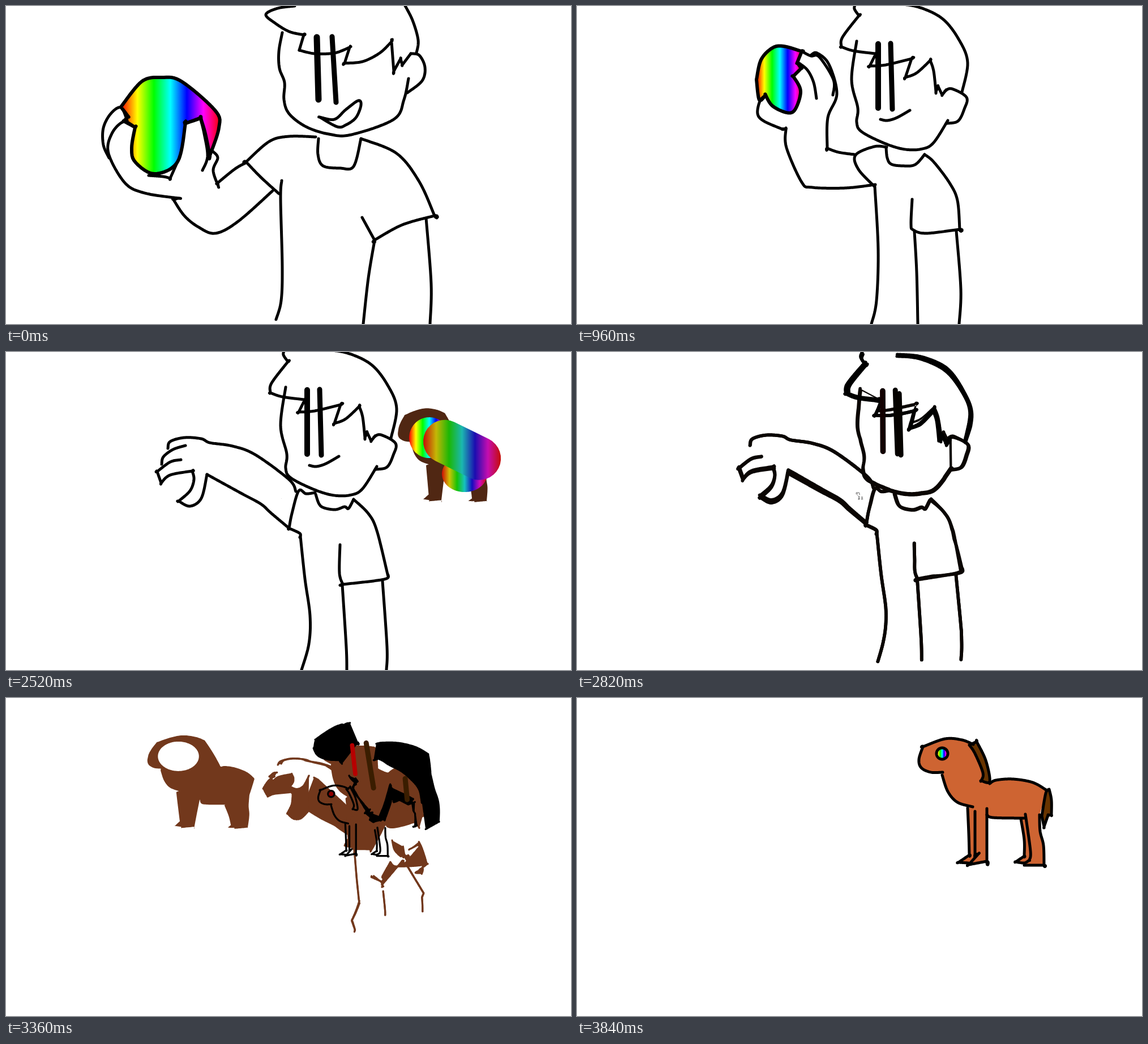
An HTML page with a canvas that plays this animation: 998x561 px, repeating every 4.8 s.

```html
<!DOCTYPE html>
<html lang="en">
<head>
<meta charset="utf-8">
<title>Ball throw</title>
<style>
html, body { margin: 0; width: 100%; height: 100%; overflow: hidden; background: #fff; }
canvas { display: block; }
</style>
</head>
<body>
<canvas id="stage" width="998" height="561"></canvas>
<script>
const ctx = document.getElementById('stage').getContext('2d');
const LOOP = 4800, STEP = 60, SAMPLES = 160;
const BLACK = [0, 0, 0], BROWN = [206, 100, 50], MANE = [104, 52, 0], SEED = [486, 258];

const mix = (a, b, t) => a + (b - a) * t;
const mixList = (a, b, t) => a.map((v, i) => mix(v, b[i], t));
const mixPoints = (a, b, t) => a.map((p, i) => mixList(p, b[i], t));
const rgb = c => `rgb(${c.map(v => Math.round(Math.min(255, v))).join(',')})`;
const shade = (c, t) => rgb(c.map(v => v * t));
const reversed = list => [...list].reverse();

// A trailing "!" marks a sharp corner.
const parse = text => text.split(' ').flatMap(word => {
  const p = word.replace('!', '').split(',').map(Number);
  return word.endsWith('!') ? [p, p] : [p];
});

function spline(pts) {
  const out = [pts[0]];
  for (let i = 0; i < pts.length - 1; i++) {
    const a = pts[Math.max(0, i - 1)], b = pts[i], c = pts[i + 1], d = pts[Math.min(pts.length - 1, i + 2)];
    for (let k = 1; k <= 10; k++) {
      const u = k / 10;
      out.push([0, 1].map(j => b[j] + u / 2 * (c[j] - a[j] +
        u * (2 * a[j] - 5 * b[j] + 4 * c[j] - d[j] + u * (3 * (b[j] - c[j]) + d[j] - a[j])))));
    }
  }
  return out;
}

function resample(pts, count = SAMPLES) {
  const at = [0];
  for (let i = 1; i < pts.length; i++) {
    at.push(at[i - 1] + Math.hypot(pts[i][0] - pts[i - 1][0], pts[i][1] - pts[i - 1][1]));
  }
  const out = [];
  for (let k = 0, i = 1; k < count; k++) {
    const d = at[at.length - 1] * k / (count - 1);
    while (i < pts.length - 1 && at[i] < d) i++;
    out.push(mixList(pts[i - 1], pts[i], (d - at[i - 1]) / (at[i] - at[i - 1] || 1)));
  }
  return out;
}

const curve = text => resample(spline(parse(text)));
const curves = set => Object.fromEntries(Object.entries(set).map(([k, v]) => [k, curve(v)]));
const sample = (fn, count = SAMPLES) => Array.from({ length: count }, (_, i) => fn(i / (count - 1)));
const turn = (x, y, rx, ry, u) => [x - rx * Math.cos(2 * Math.PI * u), y - ry * Math.sin(2 * Math.PI * u)];
const oval = (x, y, rx, ry) => sample(u => turn(x, y, rx, ry, u));

const head = {
  hair: '492,-4 490,5 498,17! 469,55 467,72! 488,79 527,84',
  top: '556,-4 600,1 645,22 675,60 690,100 680,152',
  bangs: '529,82 517,106! 545,104 591,93! 580,126! 600,118 624,96! 630,115 634,151! 638,142! 645,157! 652,148',
  ear: '650,150 662,146 688,161 684,182 673,203 654,207',
  face: '494,62 485,130 496,180 494,205 503,222 545,243 580,253 610,252 630,241 655,202',
  mouth: '536,200 548,202 565,197 588,184'
};
const holding = curves({
  hair: '510,0 480,4 459,15 475,30 500,45 526,51! 518,78',
  top: '703,-4 718,25 728,60 725,83',
  bangs: '518,78 545,84 580,83 607,73! 598,101! 630,98 660,83 681,63! 685,115! 697,93! 700,104! 715,84',
  ear: '715,84 730,87 740,108 735,132 709,153',
  face: '488,47 482,80 483,110 492,135 491,165 500,190 530,213 570,226 610,227 685,200 703,165 711,128',
  mouth: '554,196! 580,200 600,183 622,167 627,175 618,197 600,210 585,213 554,196',
  shoulder: '547,231 500,230 465,239 424,275! 450,302 482,331',
  neck: '552,234 551,262 560,282 590,286 614,283 627,234',
  sleeve: '627,234 690,260 730,310 757,370! 700,386 651,413! 629,373',
  torso: '487,308 485,340 488,460 486,520 477,553',
  armIn: '651,414 640,480 631,561',
  armOut: '742,374 751,490 749,561',
  upper: '366,257 374,268 366,290 375,318! 374,312! 405,287 425,276',
  lower: '228,214 208,204 187,225 181,260 210,312 245,330 304,339! 296,342! 315,370 340,390 370,401 410,380 471,326',
  finger: '182,268 172,245 172,215 185,190 203,179 214,202',
  thumb: '317,207! 343,197! 350,225 356,265 347,290',
  palm: '252,299 278,301 290,304! 302,277'
});
const raised = curves({
  ...head,
  shoulder: '547,249 525,248 492,263 497,288 525,318',
  neck: '546,250 548,268 555,279 575,282 597,280 614,262',
  sleeve: '614,262 630,275 658,312 672,343 676,394! 617,401 594,395 590,385 592,341',
  torso: '526,318 532,430 529,520 520,561',
  armIn: '596,398 600,470 602,561',
  armOut: '670,397 678,500 675,561',
  upper: '414,86 424,83 445,103 459,155 443,197 442,251! 462,258 490,262',
  lower: '333,157 323,168 319,190 330,203 362,217! 369,217! 370,250 397,311 415,320 475,321 527,315',
  finger: '397,80 413,88 428,90 453,130 452,157',
  thumb: '391,100 407,113 418,135 423,163',
  palm: '362,217 369,217'
});
const thrown = curves({
  ...head,
  shoulder: '546,248 530,250 517,245 505,285 500,311! 519,320 519,327',
  neck: '547,251 553,268 562,275 582,278 598,273 605,276 614,260',
  sleeve: '614,260 640,285 655,315 674,392! 668,401 595,410! 589,390 590,340',
  torso: '520,325 528,400 537,465 535,515 522,561',
  armIn: '594,411 601,520 602,561',
  armOut: '665,404 673,520 672,561',
  upper: '286,170 290,158 315,151 345,153 360,160 400,166 440,181 500,225 512,246',
  lower: '355,216 415,249 450,268 468,284 499,310',
  finger: '317,165 295,172 278,185 275,198',
  thumb: '309,190 290,194 267,211! 274,231! 290,217 329,210! 332,225 325,245 305,263! 325,272 345,258 355,216'
});
const openEyes = [[532, 67, 532, 180, 10], [554, 66, 557, 182, 9]];
const heldEyes = [[549, 55, 552, 165, 11], [576, 54, 583, 170, 9]];
const heldBall = curve('203,178 240,133 275,126 310,133 370,185 376,215 360,264! 352,225 344,198! 317,207! 303,275 262,296 228,275 222,250 228,214! 208,203! 216,195! 203,178');
const raisedBall = curve('317,130 325,95 345,74 365,71 397,80! 389,100! 396,110! 382,124! 395,150 385,183 370,188 345,176 333,157! 322,166 317,130');

const horse = curves({
  head: '646,131 625,131 608,123 604,108 611,86! 650,72 680,74 700,82',
  neck: '645,136 655,165 672,184 699,192',
  mane: '693,83 706,77! 722,110 729,147 714,146! 717,132 703,98 693,83',
  back: '729,151 740,145 770,143 805,149 830,163',
  tail: '834,161 838,180 838,206! 832,207! 825,227! 821,208! 828,168 834,161',
  belly: '724,206 735,211 790,212',
  farFront: '690,194 692,240 693,277! 674,290! 691,291',
  front: '703,200 703,276! 709,275! 692,294! 724,288! 724,195',
  farBack: '784,213 790,250 790,279! 775,289! 790,291 799,286! 801,270 792,205',
  hind: '817,206 818,235 824,260 825,295! 790,295'
});
const eye = oval(645, 98, 10, 10);

// Silhouette, clockwise from the jaw, joined from the pen lines.
const body = resample([
  ...horse.head, ...horse.back, ...horse.hind,
  ...reversed(horse.farBack).slice(SAMPLES * .45), ...reversed(horse.belly),
  ...reversed(horse.front).slice(0, SAMPLES * .54), ...reversed(horse.farFront),
  ...reversed(horse.neck), horse.head[0]
], 1000);
const onBody = u => body[Math.round((u + 1) % 1 * (body.length - 1))];
const arc = (from, to) => sample(u => onBody(mix(from, to, u)));

// Both edges of a pen line spread to two stretches of the silhouette.
const part = (line, a, b, color = BROWN, other = line) =>
  ({ color, starts: [thrown[line], thrown[other]], ends: [arc(...a), arc(...b)], hollow: line !== other });
const parts = [
  part('face', [.05, -.45], [.08, .33], BROWN, 'bangs'),
  part('ear', [.67, .57], [.7, .6]),
  part('upper', [.11, .22], [.1, .2]),
  part('lower', [.96, .92], [.155, .228]),
  part('thumb', [.06, -.06], [.08, .14]),
  part('shoulder', [.95, .88], [.96, .9]),
  part('neck', [.42, .49], [.55, .5]),
  part('sleeve', [.4, .79], [.53, .78]),
  part('torso', [.9, .79], [.89, .79]),
  part('armIn', [.74, .7], [.74, .7]),
  part('armOut', [.63, .57], [.63, .57]),
  part('bangs', [.95, .5], [.93, .6], BLACK),
  part('hair', [.16, -.01], [.22, .155], BLACK),
  part('top', [.23, .48], [.665, .6], BLACK)
];
const bars = [
  { color: [330, 0, 0], from: openEyes[0], to: [675, 97, 685, 97, 6] },
  { color: MANE, from: openEyes[1], to: [702, 90, 723, 140, 9] },
  { color: MANE, from: openEyes[1], to: [826, 203, 830, 177, 9] }
];

// A round shape opens into the silhouette, its left side becoming the muzzle.
const unfold = (x, y, rx, ry) => {
  const shape = sample(u => [turn(x, y, rx, ry, Math.sqrt(u)), onBody(u + .05)], 400);
  return (t, dx = 0) => shape.map(([a, [bx, by]]) => mixList(a, [bx + dx, by], t));
};
const lostBall = unfold(-121, 109, 72, 50);
const lostHole = oval(-121, 109, 69, 46);
const newBall = unfold(960, 185, 45, 51);

function trace(pts, closed) {
  ctx.beginPath();
  pts.forEach(p => ctx.lineTo(...p));
  if (closed) ctx.closePath();
}

function fill(pts, style) {
  trace(pts, true);
  ctx.fillStyle = style;
  ctx.fill();
}

function stroke(pts, width = 5, style = '#000', closed = false) {
  trace(pts, closed);
  ctx.lineWidth = width;
  ctx.strokeStyle = style;
  ctx.stroke();
}

const bar = ([x1, y1, x2, y2, w], style) => stroke([[x1, y1], [x2, y2]], w, style);

function rainbow(left, right, tint = BLACK, amount = 0) {
  const g = ctx.createLinearGradient(left, 0, right, 0);
  const channel = h => 255 * Math.min(1, Math.max(0, Math.abs((h + 6) % 6 - 3) - 1));
  for (let h = 0; h <= 6; h++) {
    g.addColorStop(h / 6, rgb(mixList([channel(h), channel(h - 2), channel(h - 4)], tint, amount)));
  }
  return g;
}

function rainbowFill(pts, tint, amount) {
  const xs = pts.map(p => p[0]);
  fill(pts, rainbow(Math.min(...xs), Math.max(...xs), tint, amount));
}

function drawBall(pts) {
  rainbowFill(pts);
  stroke(pts, 6, '#000', true);
}

function drawFigure(pose, eyes, talk = 0) {
  for (const name in pose) {
    if (name === 'mouth' && talk) stroke(oval(562, 202 + 12 * talk, 26, 5 + 18 * talk), 4, '#000', true);
    else stroke(pose[name]);
  }
  eyes.forEach(([x1, y1, x2, y2, w]) => bar([x1, y1 + 70 * talk, x2, y2, w], '#000'));
}

function drawEye(t, width) {
  if (t < 1) fill(eye, rgb([255 * t, 0, 0]));
  else rainbowFill(eye);
  stroke(eye, width, '#000', true);
}

function drawHorse(dx = 0) {
  ctx.save();
  ctx.translate(dx, 0);
  fill(body, rgb(BROWN));
  fill(horse.mane, rgb(MANE));
  fill(horse.tail, rgb(MANE));
  Object.values(horse).forEach(line => stroke(line));
  drawEye(1, 5);
  ctx.restore();
}

function drawSeed(t) {
  const width = 7 - 2 * t;
  ctx.save();
  ctx.translate(...SEED);
  ctx.scale(t, t);
  ctx.translate(-SEED[0], -SEED[1]);
  for (const name of ['head', 'neck', 'mane', 'farFront', 'front', 'farBack', 'hind']) stroke(horse[name], width);
  drawEye(t, width);
  ctx.restore();
}

// The returning ball splits into coloured lobes that settle into the horse.
function drawArrival(t) {
  const tint = BROWN.map(v => v * t * .7);
  const lobe = (...to) => mixList([960, 185, 45, 51], to, t);
  fill(newBall(t, -90), rgb(tint));
  rainbowFill(oval(...lobe(578, 124, 28, 24)));
  rainbowFill(oval(...lobe(690, 239, 36, 17)), tint, t * .5);
  const [x1, y1] = lobe(627, 136, 0, 0), [x2, y2] = lobe(737, 190, 0, 0), w = mix(100, 57, t);
  bar([x1, y1, x2, y2, w], rainbow(x1 - w / 2, x2 + w / 2, tint, t * .6));
}

function drawPart({ color, starts, ends, hollow }, t) {
  const [a, b] = starts.map((line, i) => mixPoints(line, ends[i], t));
  const pts = [...a, ...reversed(b)], style = shade(color, t);
  fill(pts, style);
  stroke(a, 6 - 5 * t, style);
  stroke(b, 6 - 5 * t, style);
  const gap = 1 - (4 * t) ** 2;
  if (hollow && gap > 0) {
    const center = [0, 1].map(j => pts.reduce((sum, p) => sum + p[j], 0) / pts.length);
    fill(pts.map(p => mixList(center, p, gap)), '#fff');
  }
}

function drawMorph(t) {
  fill(lostBall(t), shade(BROWN, t));
  fill(mixPoints(lostHole, eye, t), '#fff');
  parts.forEach(p => drawPart(p, t));
  bars.forEach(({ color, from, to }) => bar(mixList(from, to, t), shade(color, t)));
  drawSeed(t);
}

function draw(ms) {
  ctx.fillStyle = '#fff';
  ctx.fillRect(0, 0, 998, 561);
  ctx.lineCap = ctx.lineJoin = 'round';
  if (ms < 1020) {
    const t = Math.max(0, (ms - 540) / 420);
    drawBall(mixPoints(heldBall, raisedBall, t));
    const pose = Object.fromEntries(Object.keys(holding).map(k => [k, mixPoints(holding[k], raised[k], t)]));
    drawFigure(pose, heldEyes.map((e, i) => mixList(e, openEyes[i], t)));
  } else if (ms < 2820) {
    drawFigure(thrown, openEyes, Math.max(0, 1 - Math.abs(ms - 1980) / 120));
    ctx.fillStyle = '#ddd';
    ctx.fillRect(...SEED, 1, 1);
    const flight = (ms - 960) / STEP;
    if (flight < 4) drawBall(oval(357 - 127 * flight, 130 - 7 * flight, 41, 58));
    if (ms >= 2760) drawHorse(-90);
    else if (ms >= 2280) drawArrival((ms - 2220) / 540);
  } else if (ms < 3840) {
    drawMorph((ms - 2760) / 1080);
  } else {
    drawHorse();
  }
}

const start = performance.now();
function tick() {
  draw(Math.floor((performance.now() - start) % LOOP / STEP) * STEP);
  requestAnimationFrame(tick);
}
tick();
</script>
</body>
</html>
```
